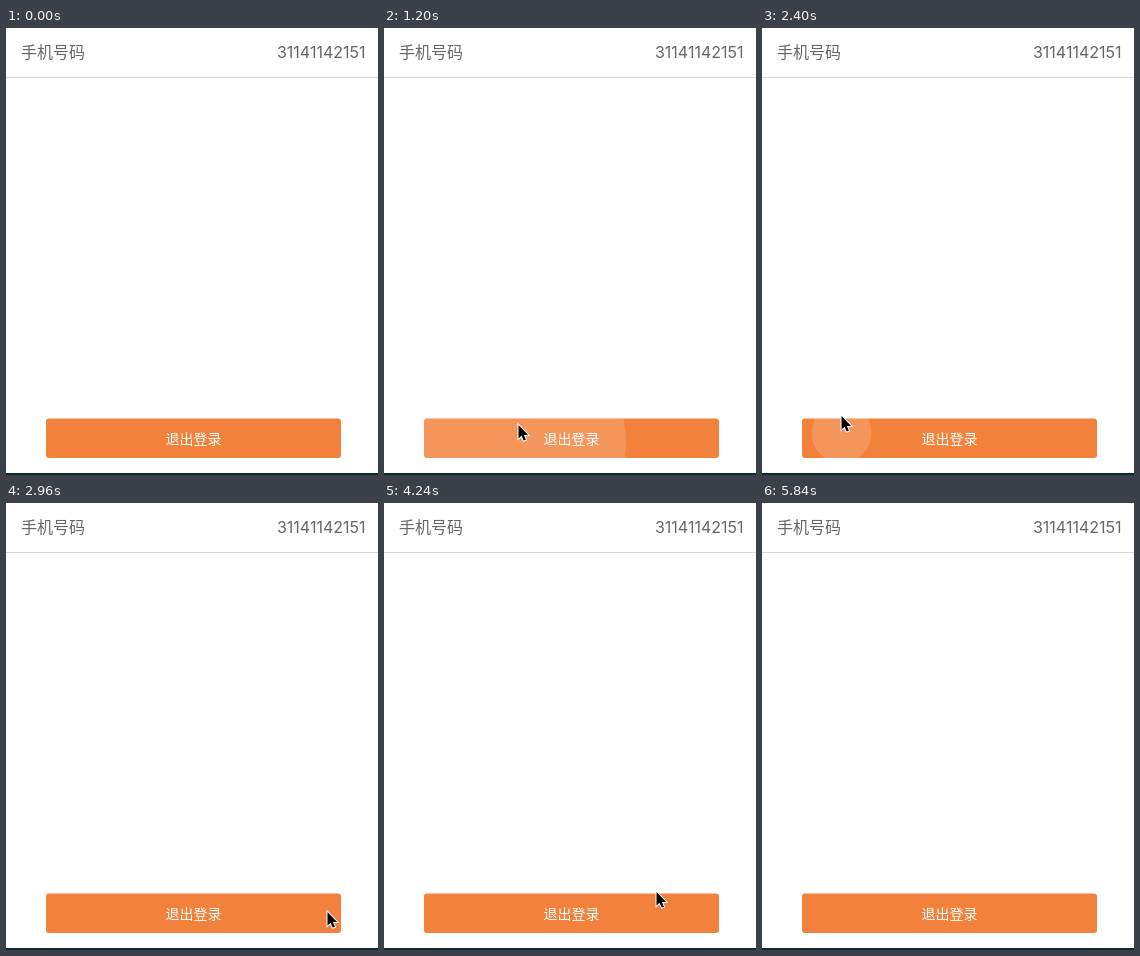
Recreate the animation shown at these times as an HTML page. Size 372 px wide and 447 px high, loop 6.48 s.

```html
<!DOCTYPE html>
<html lang="zh-CN">
<head>
<meta charset="utf-8">
<title>退出登录</title>
<style>
  html, body { margin: 0; width: 100%; height: 100%; overflow: hidden; background: #fff; }
  svg { display: block; width: 372px; height: 447px; }
  text { font: 16px "Noto Sans CJK SC", "Noto Sans CJK", sans-serif; fill: #666; }
  .number { font-family: Inter, sans-serif; text-anchor: end; }
  .label { font-size: 14px; fill: #fff; text-anchor: middle; }
</style>
</head>
<body>
<svg viewBox="0 0 372 447">
  <defs>
    <clipPath id="button"><rect x="40" y="390.5" width="295" height="39.5" rx="3"/></clipPath>
  </defs>
  <text x="15" y="30">手机号码</text>
  <text class="number" x="359.5" y="30">31141142151</text>
  <rect y="49" width="372" height="1" fill="#d9d9d9"/>
  <rect y="445" width="372" height="2" fill="#062b36"/>
  <g clip-path="url(#button)">
    <rect x="40" y="390" width="295" height="40" fill="#f2813b"/>
    <circle id="ripple" r="0" fill="#fff" fill-opacity=".17"/>
  </g>
  <text class="label" x="187.5" y="416">退出登录</text>
  <path id="cursor" d="M0 0V13.6L3.1 10.8L5.2 15.6L7.4 14.7L5.4 9.9H9.6Z"
        stroke="#fff" stroke-width="2" paint-order="stroke"/>
</svg>
<script>
const LOOP = 6480, STEP = 80, GROW = 400, RADIUS = 295;
const ripple = document.getElementById('ripple');
const cursor = document.getElementById('cursor');

const entry = { x: 146, y: 429 };
// bend: how far the path bows downwards half way
const moves = [
  { from: 240, to: 720, x: 134, y: 396, bend: 0 },
  { from: 1440, to: 1840, x: 79, y: 387, bend: 0 },
  { from: 2720, to: 2960, x: 321, y: 408, bend: -18 },
  { from: 3120, to: 3360, x: 325, y: 403, bend: 0 },
  { from: 4080, to: 4240, x: 272, y: 388, bend: 0 },
  { from: 4320, to: 4880, x: 211, y: 382, bend: 8 },
  { from: 5600, to: 5840, x: 207, y: 450, bend: 0 }
];
const presses = [
  { down: 1032, up: 1520 }, { down: 2311, up: 2800 },
  { down: 3580, up: 4160 }, { down: 5098, up: 5680 }
];

const clamp = v => Math.min(1, Math.max(0, v));
const easeOut = p => 1 - (1 - p) ** 2;

// cubic-bezier(.42, 0, .58, 1), solved by bisection
function easeInOut(p) {
  let lo = 0, hi = 1;
  for (let i = 0; i < 20; i++) {
    const s = (lo + hi) / 2, q = 1 - s;
    if (1.26 * s * q * q + 1.74 * s * s * q + s ** 3 < p) lo = s; else hi = s;
  }
  return lo * lo * (3 - 2 * lo);
}

function pointerAt(t) {
  let { x, y } = entry;
  for (const m of moves) {
    const e = easeOut(clamp((t - m.from) / (m.to - m.from)));
    x += (m.x - x) * e;
    y += (m.y - y) * e + m.bend * 4 * e * (1 - e);
  }
  return { x: Math.round(x), y: Math.round(y) };
}

function draw(t) {
  const tip = pointerAt(t);
  cursor.setAttribute('visibility', t > moves[0].from ? 'visible' : 'hidden');
  cursor.setAttribute('transform', `translate(${tip.x + 0.5} ${tip.y + 1})`);

  const press = presses.find(p => t >= p.down && t < p.up);
  const r = press ? RADIUS * easeInOut(clamp((t - press.down) / GROW)) : 0;
  ripple.setAttribute('r', r);
  if (press) {
    const spot = pointerAt(press.down);
    ripple.setAttribute('cx', spot.x + 0.5);
    ripple.setAttribute('cy', spot.y + 18);
  }
}

const start = performance.now();
function frame() {
  const t = (performance.now() - start) % LOOP;
  draw(Math.floor(t / STEP) * STEP);
  requestAnimationFrame(frame);
}
frame();
</script>
</body>
</html>
```
